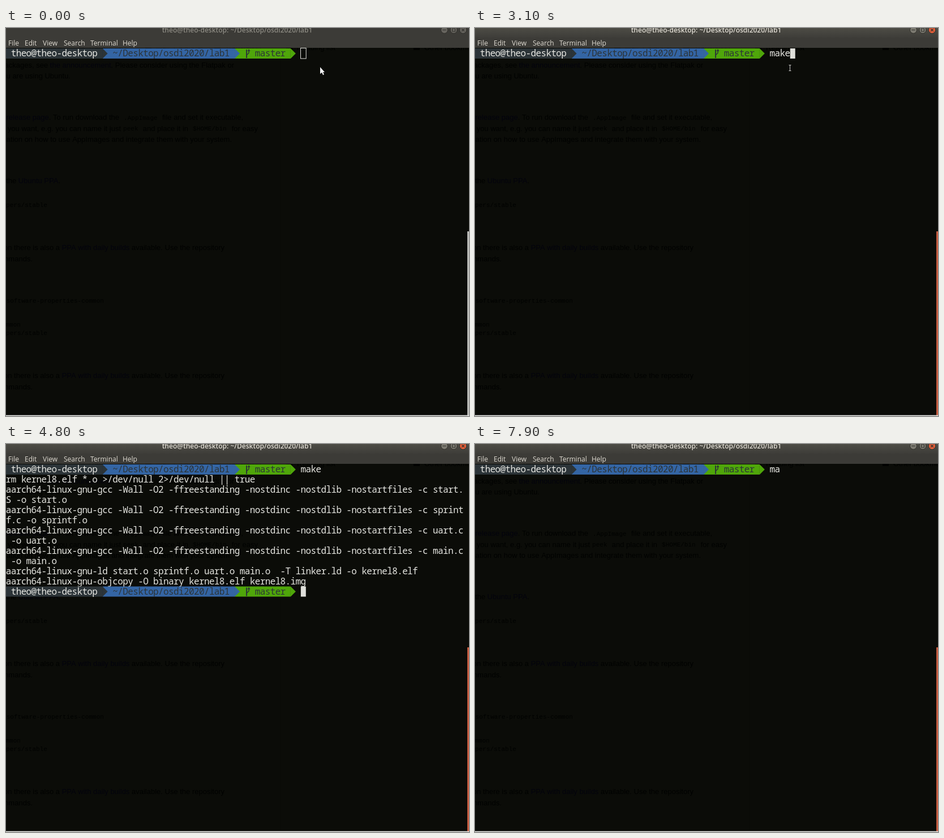
Animation of 818x685 px, one loop 8000 ms. Source, as an HTML page with a canvas:

```html
<!DOCTYPE html>
<html lang="en">
<head>
<meta charset="utf-8">
<title>Terminal</title>
<style>
html, body { margin: 0; width: 818px; height: 685px; overflow: hidden; background: #0b0c08; }
canvas { display: block; }
</style>
</head>
<body>
<canvas id="stage" width="818" height="685"></canvas>
<script>
const ctx = document.getElementById('stage').getContext('2d');
const LOOP = 8000, CELL_W = 8.98, CELL_H = 17.96, TOP = 36, COLS = 90;
const USER = 'theo@theo-desktop', DIR = '~/Desktop/osdi2020/lab1';
const INK = '#e6e6e1', SLATE = '#2c3438', BLUE = '#3465a4', GREEN = '#4fa60a';
const GHOST = '#010200', LINK = '#03030d';
const MONO = '16px "Noto Sans Mono", monospace';
const SANS = '13px "Liberation Sans", sans-serif';
const CODE = '11.05px "Liberation Mono", monospace';

const compile = (src, obj) =>
  `aarch64-linux-gnu-gcc -Wall -O2 -ffreestanding -nostdinc -nostdlib -nostartfiles -c ${src} -o ${obj}.o`;
const wrap = line => line.length > COLS ? [line.slice(0, COLS), line.slice(COLS)] : [line];
const OUTPUT = [
  'rm kernel8.elf *.o >/dev/null 2>/dev/null || true',
  compile('start.S', 'start'),
  compile('sprintf.c', 'sprintf'),
  compile('uart.c', 'uart'),
  compile('main.c', 'main'),
  'aarch64-linux-gnu-ld start.o sprintf.o uart.o main.o  -T linker.ld -o kernel8.elf',
  'aarch64-linux-gnu-objcopy -O binary kernel8.elf kernel8.img'
].flatMap(wrap);

// Each step: start time, typed text, cursor shown, output rows.
const STEPS = [
  [0, '', true, 0], [1200, '', false, 0], [1900, '', true, 0],
  [2300, 'm', true, 0], [2400, 'm', false, 0], [2600, 'ma', false, 0],
  [2900, 'mak', false, 0], [3100, 'make', true, 0],
  [3600, '', true, 5], [3700, '', true, 9],
  [3800, '', true, 11], [4200, '', false, 11], [4800, '', true, 11], [5400, '', false, 11],
  [5600, 'c', false, 11], [6000, 'cl', true, 11], [6400, 'cle', true, 11],
  [6600, 'clea', false, 11], [6700, 'clear', false, 11],
  [7000, null, true, 0], [7100, '', true, 0],
  [7400, 'm', true, 0], [7600, 'm', false, 0], [7900, 'ma', false, 0]
];

const cellX = col => col * CELL_W;
const cellY = row => TOP + row * CELL_H;

function rect(color, x, y, w, h) {
  ctx.fillStyle = color;
  ctx.fillRect(x, y, w, h);
}

function label(text, x, y, font, color, align = 'left') {
  ctx.font = font;
  ctx.fillStyle = color;
  ctx.textAlign = align;
  ctx.fillText(text, x, y);
}

function line(color, width, ...points) {
  ctx.strokeStyle = color;
  ctx.lineWidth = width;
  ctx.beginPath();
  points.forEach(([x, y]) => ctx.lineTo(x, y));
  ctx.stroke();
}

function type(text, col, row, color = INK) {
  [...text].forEach((ch, i) =>
    label(ch, cellX(col + i + 0.5), cellY(row) + 14, MONO, color, 'center'));
}

// Text runs that end at a given right edge; runs starting with * are links.
function runs(right, y, ...parts) {
  let x = right;
  for (const part of parts.reverse()) {
    const link = part[0] === '*', text = link ? part.slice(1) : part;
    label(text, x, y, SANS, link ? LINK : GHOST, 'right');
    x -= ctx.measureText(text).width;
  }
}

function drawPageBehind() {
  rect('#0b0c08', 0, 0, 818, 685);
  rect('#090a06', 485, 54, 1, 629);

  const marks = [[15, 'Home'], [72, 'Topics'], [147, 'Recent lists'], [265, 'Mail  Calendar'],
    [387, 'Translation'], [514, 'Reading list'], [739, 'Other bookmarks']];
  for (const [x, text] of marks) {
    label(text, x, 39, SANS, GHOST);
    if (x > 20) rect(GHOST, x - 19, 30, 11, 9);
  }

  runs(403, 70, 'packages, see ', '*the announcement', '. Please consider using the Flatpak or');
  runs(114, 89, 'if you are using Ubuntu.');
  runs(200, 162, '*release page', '. To run download the');
  label('.AppImage', 208, 162, CODE, GHOST);
  runs(419, 162, 'file and set it executable,');
  runs(203, 182, 'you want, e.g. you can name it just');
  label('peek', 207, 181, CODE, GHOST);
  runs(322, 182, 'and place it in');
  label('$HOME/bin', 330, 181, CODE, GHOST);
  runs(445, 182, 'for easy');
  runs(399, 201, 'ation on how to use AppImages and integrate them with your system.');
  runs(96, 274, 'the ', '*Ubuntu PPA', '.');
  for (const y of [392, 618]) {
    runs(386, y, 'on there is also a ', '*PPA with daily builds', ' available. Use the repository');
    runs(47, y + 20, 'commands.');
  }
  const code = [['pers/stable', 73, 316], ['software-properties-common', 173, 485],
    ['common', 26, 527], ['pers/stable', 73, 542]];
  for (const [text, x, y] of code) label(text, x, y, CODE, GHOST, 'right');
}

function arrow(col, row, color) {
  const x = cellX(col), y = cellY(row);
  ctx.fillStyle = color;
  ctx.beginPath();
  ctx.moveTo(x, y);
  ctx.lineTo(x + CELL_W, y + CELL_H / 2);
  ctx.lineTo(x, y + CELL_H);
  ctx.fill();
}

function drawBranch(row) {
  const x = cellX(47), y = cellY(row);
  line(SLATE, 2, [x + 3, y + 2], [x + 3, y + 17]);
  line(SLATE, 1.5, [x + 3, y + 12], [x + 7, y + 8], [x + 7, y + 4]);
  ctx.fillStyle = SLATE;
  ctx.beginPath();
  ctx.moveTo(x + 4.5, y + 5);
  ctx.lineTo(x + 7, y + 1);
  ctx.lineTo(x + 9.5, y + 5);
  ctx.fill();
}

function drawPrompt(row) {
  const bar = (color, from, to) => rect(color, cellX(from), cellY(row), (to - from) * CELL_W, CELL_H);
  bar(BLUE, 19, 45);
  bar(GREEN, 45, 56);
  bar(SLATE, 0, 19);
  arrow(19, row, SLATE);
  arrow(45, row, BLUE);
  arrow(56, row, GREEN);
  type(USER, 1, row);
  type(DIR, 21, row, SLATE);
  drawBranch(row);
  type('master', 49, row, SLATE);
}

function drawCursor(col, row, focused) {
  const x = cellX(col), y = cellY(row);
  if (focused) {
    rect('#dfdfda', x, y, CELL_W, CELL_H);
  } else {
    ctx.strokeStyle = '#dfdfda';
    ctx.lineWidth = 1;
    ctx.strokeRect(Math.floor(x) + 0.5, y - 0.5, CELL_W + 0.7, CELL_H + 0.5);
  }
}

function drawButton(x, fill, glyph) {
  ctx.beginPath();
  ctx.arc(x, 3.5, 6, 0, Math.PI * 2);
  ctx.fillStyle = fill;
  ctx.fill();
  ctx.strokeStyle = '#2f2e2a';
  ctx.lineWidth = 1;
  ctx.stroke();
  if (glyph === 'min') line('#33322e', 1, [x - 3, 3.5], [x + 3, 3.5]);
  if (glyph === 'max') ctx.strokeRect(x - 2.5, 1, 5, 5);
  if (glyph === 'close') {
    line('#33322e', 1.2, [x - 2.5, 1], [x + 2.5, 6]);
    line('#33322e', 1.2, [x - 2.5, 6], [x + 2.5, 1]);
  }
}

function drawFrame(focused, title) {
  rect('#3c3b37', 0, 0, 818, 35);
  if (focused) {
    const shade = ctx.createLinearGradient(0, 0, 0, 17);
    shade.addColorStop(0, '#4d4c45');
    shade.addColorStop(1, '#3e3d39');
    rect(shade, 0, 0, 818, 17);
  }
  label(title, 408.5, 8, '600 12px "Open Sans", sans-serif', focused ? '#dfdbd2' : '#8b8981', 'center');
  const grey = focused ? '#7b7970' : '#66645e';
  drawButton(774.5, grey, 'min');
  drawButton(791, grey, 'max');
  drawButton(807.5, focused ? '#e9603a' : grey, 'close');

  const menu = [['File', 4], ['Edit', 33], ['View', 65], ['Search', 102], ['Terminal', 149], ['Help', 206]];
  for (const [text, x] of menu) label(text, x, 30.5, '12px "Open Sans", sans-serif', '#dfdbd2');

  rect(focused ? '#c65d41' : '#b9b9b5', 815, 359, 3, 325);
  rect('#050504', 0, 682, 815, 1);
  rect('#e2e2e0', 0, 683.5, 818, 1.5);
}

function drawArrowPointer() {
  const tip = [[555, 69], [555, 81], [558, 78.5], [560, 83], [562, 82], [560, 78], [563, 78]];
  ctx.beginPath();
  tip.forEach(([x, y]) => ctx.lineTo(x, y));
  ctx.closePath();
  ctx.fillStyle = '#f4f4f4';
  ctx.fill();
}

function drawTextPointer() {
  line('#c9c9c6', 1, [556.5, 65], [556.5, 76]);
  for (const y of [65.5, 75.5]) line('#c9c9c6', 1, [554.5, y], [558.5, y]);
}

function draw(t) {
  const [, typed, cursor, rows] = STEPS.findLast(step => step[0] <= t);
  const focused = t >= 700, building = t >= 3600 && t < 3800;
  const done = rows === OUTPUT.length;

  drawPageBehind();
  if (typed !== null) drawPrompt(0);
  if (rows) type('make', 58, 0);
  OUTPUT.slice(0, rows).forEach((text, i) => type(text, 0, i + 1));

  const row = rows ? rows + 1 : 0;
  const col = building || typed === null ? 0 : 58 + typed.length;
  if (done) drawPrompt(row);
  if (typed) type(typed, 58, row);
  if (cursor) drawCursor(col, row, focused);

  drawFrame(focused, building ? 'make' : `${USER}: ${DIR}`);
  if (t < 100) drawArrowPointer();
  else if (t < 3600) drawTextPointer();
}

const start = performance.now();
function tick() {
  draw((performance.now() - start) % LOOP);
  requestAnimationFrame(tick);
}
tick();
</script>
</body>
</html>
```
